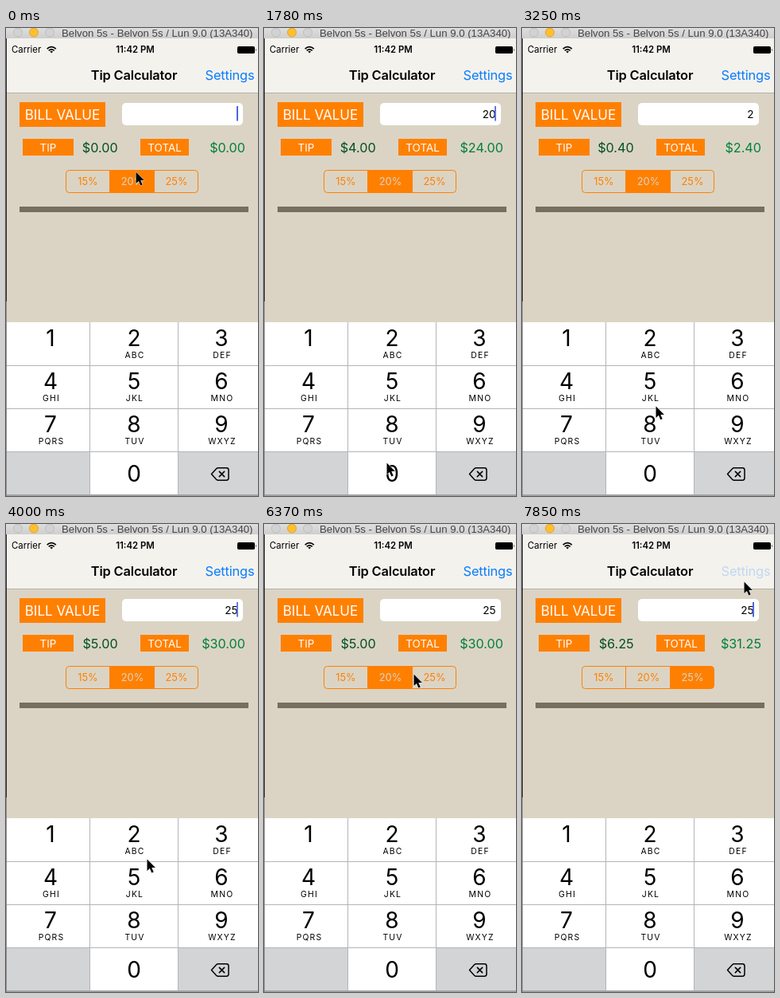
These frames come from a looping animation (317x587 px, 8 s). An HTML page:

```html
<!DOCTYPE html>
<html lang="en">
<head>
<meta charset="utf-8">
<title>Tip Calculator</title>
<style>
  html, body { margin: 0; width: 100%; height: 100%; overflow: hidden; background: #dbd4c5; }
  svg { display: block; width: 317px; height: 587px; font-family: Inter, Roboto, sans-serif; }
  .mid { text-anchor: middle; }
  .end { text-anchor: end; }
  .tag rect { fill: #ff8000; }
  .tag text { fill: #fff; text-anchor: middle; }
  .money { font-size: 16.2px; text-anchor: end; }
  .seg text { font-size: 12.8px; text-anchor: middle; fill: #ff8000; }
  .seg path { fill: none; }
  .seg .on path { fill: #ff8000; }
  .seg .on text { fill: #dbd4c5; }
  .key rect { fill: #fff; }
  .key.down rect { fill: #d2d4d6; }
  .num { font-size: 28px; text-anchor: middle; }
  .abc { font-size: 10.4px; letter-spacing: 1.2px; text-anchor: middle; }
  .del rect { fill: #d2d4d6; }
  .del .shape { fill: none; stroke: #000; stroke-width: 1.5; stroke-linejoin: round; }
  .del .x { fill: none; stroke: #000; stroke-width: 1.6; stroke-linecap: round; }
  .del.down rect { fill: #fff; }
  .del.down .shape { fill: #000; }
  .del.down .x { stroke: #fff; }
</style>
</head>
<body>
<svg viewBox="0 0 317 587">
  <defs>
    <linearGradient id="chrome" x2="0" y2="1">
      <stop offset="0" stop-color="#dedede"/><stop offset="1" stop-color="#cecece"/>
    </linearGradient>
  </defs>
  <rect width="317" height="587" fill="#dbd4c5"/>

  <!-- window chrome -->
  <rect width="317" height="13" fill="url(#chrome)"/>
  <g fill="#d2d2d2" stroke="#bdbdbd">
    <circle cx="15" cy="5.5" r="5.5"/>
    <circle cx="35" cy="5.5" r="5.5" fill="#ffbf2f" stroke="#e2a32c"/>
    <circle cx="55" cy="5.5" r="5.5"/>
  </g>
  <text x="70" y="11" font-size="13.2" fill="#444" font-family="Liberation Sans, Arial, sans-serif">Belvon 5s - Belvon 5s / Lun 9.0 (13A340)</text>

  <!-- status and navigation bars -->
  <rect y="13" width="317" height="68" fill="#f4f2ed"/>
  <rect y="81" width="317" height="1" fill="#b5b1a9"/>
  <text x="7" y="31" font-size="11.4">Carrier</text>
  <g fill="none" stroke="#000" stroke-width="1.7">
    <path d="M51.6 26.1Q57.2 21 62.8 26.1M53.7 28.4Q57.2 25.2 60.7 28.4"/>
    <path d="M55.4 29.5Q57.2 28 59 29.5L57.2 31.6Z" fill="#000" stroke="none"/>
  </g>
  <text class="mid" x="162.5" y="31" font-size="11.4" font-weight="600">11:42 PM</text>
  <rect x="291" y="23" width="22" height="9" rx="1.8"/>
  <path d="M314 25.7Q315.6 27.5 314 29.3Z"/>
  <text class="mid" x="161" y="65" font-size="16.4" font-weight="600" letter-spacing="-.15">Tip Calculator</text>
  <text class="end" id="settings" x="312.5" y="65" font-size="16.4" letter-spacing="-.15" fill="#087cff">Settings</text>

  <!-- bill -->
  <g class="tag">
    <rect x="17" y="93" width="108" height="31"/><text x="71" y="114.5" font-size="17">BILL VALUE</text>
    <rect x="21" y="139" width="64" height="21"/><text x="53" y="154.5" font-size="13.4">TIP</text>
    <rect x="169" y="139" width="61" height="21"/><text x="199.5" y="154.5" font-size="13.4">TOTAL</text>
  </g>
  <rect x="146" y="94" width="152" height="28" rx="5" fill="#fff"/>
  <text class="end" id="bill" x="291.5" y="113" font-size="13.6"></text>
  <rect id="caret" x="290" y="98" width="2" height="18.5" fill="#4a69e2"/>
  <text class="money" id="tip" x="140.7" y="155.5" fill="#00501f"></text>
  <text class="money" id="total" x="301" y="155.5" fill="#00803a"></text>

  <g class="seg" id="segs" stroke-width="1">
    <g><path d="M130.5 178.5H79.5Q75.5 178.5 75.5 182.5V202.5Q75.5 206.5 79.5 206.5H130.5Z" stroke="#ff8000"/><text x="103" y="197">15%</text></g>
    <g><path d="M130.5 178.5H186.5V206.5H130.5Z" stroke="#ff8000"/><text x="159" y="197">20%</text></g>
    <g><path d="M186.5 178.5H237.5Q241.5 178.5 241.5 182.5V202.5Q241.5 206.5 237.5 206.5H186.5Z" stroke="#ff8000"/><text x="214.5" y="197">25%</text></g>
  </g>
  <rect x="17" y="224" width="288" height="7" fill="#786e5d"/>

  <!-- keypad -->
  <rect y="369" width="317" height="216" fill="#d2d4d6"/>
  <g id="keys"></g>
  <g class="del" id="del">
    <rect x="217" y="532" width="100" height="53"/>
    <path class="shape" d="M258.5 559.5L264.6 552.8Q265.6 551.8 267 551.8H277.3Q280 551.8 280 554.5V564.5Q280 567.2 277.3 567.2H267Q265.6 567.2 264.6 566.2Z"/>
    <path class="x" d="M268.4 556.4L274.6 562.6M274.6 556.4L268.4 562.6"/>
  </g>
  <path d="M0 423.5H317M0 477.5H317M0 531.5H317M105.5 369V585M216.5 369V585" stroke="#b4b5b7" fill="none"/>

  <!-- window edges -->
  <rect y="585" width="317" height="2" fill="#a3a3a1"/>
  <rect y="13" width="1" height="330" fill="#2a2725"/>
  <rect y="343" width="1" height="244" fill="#8d8d8d"/>

  <path id="mouse" d="M.5 .5V15L3.9 11.9L6.3 17.4L8.7 16.4L6.3 11H10.9Z" stroke="#fff" stroke-width="1" paint-order="stroke"/>
</svg>
<script>
  const LOOP = 8000, STEPS = 54;
  const $ = id => document.getElementById(id);

  // time, x, y of the pointer tip
  const path = [
    [0, 163, 180], [100, 163, 180], [444, 161, 388], [593, 161, 390], [1037, 154, 545],
    [2080, 154, 545], [2500, 238, 553], [2815, 238, 553], [3259, 168, 474], [3407, 162, 446],
    [3852, 162, 446], [4000, 177, 420], [4444, 104, 190], [4890, 103, 188], [5481, 140, 187],
    [5640, 156, 188], [5935, 156, 188], [6370, 188, 188], [6600, 202, 188], [7115, 202, 188],
    [7700, 279, 72], [LOOP, 279, 72]
  ];

  // time, bill, tip percent, pressed key
  const states = [
    [0, "", 20], [440, "", 20, "2"], [590, "2", 20], [1180, "2", 20, "0"], [1330, "20", 20],
    [2515, "2", 20, "del"], [2810, "2", 20], [3405, "2", 20, "5"], [3550, "25", 20],
    [4590, "25", 15], [5775, "25", 20], [6660, "25", 25], [7850, "25", 25, "settings"]
  ];
  const typed = [-100, 590, 1330, 2515, 3550];

  const colX = [1, 106, 217], colW = [104, 110, 100], mid = [56, 161, 271];
  const letters = ["", "ABC", "DEF", "GHI", "JKL", "MNO", "PQRS", "TUV", "WXYZ"];

  function key(digit, col, row, abc) {
    const y = 370 + row * 54;
    const base = y + (abc === undefined ? 36.5 : 29);
    return `<g class="key" id="k${digit}">
      <rect x="${colX[col]}" y="${y - 1}" width="${colW[col]}" height="54"/>
      <text class="num" x="${mid[col]}" y="${base}">${digit}</text>
      <text class="abc" x="${mid[col] + 1}" y="${y + 44.3}">${abc || ""}</text></g>`;
  }
  $("keys").innerHTML =
    letters.map((abc, i) => key(i + 1, i % 3, Math.floor(i / 3), abc)).join("") + key(0, 1, 3);

  const clamp = v => Math.max(0, Math.min(1, v));
  const latest = (list, t, at) => list.filter(e => at(e) <= t).pop();

  function pointer(t) {
    const i = path.findIndex(p => p[0] > t);
    const [t0, x0, y0] = path[i - 1], [t1, x1, y1] = path[i];
    const u = (t - t0) / (t1 - t0);
    return [x0 + (x1 - x0) * u, y0 + (y1 - y0) * u];
  }

  function caretAlpha(t) {
    const p = (t - latest(typed, t, e => e)) % 1000;
    return p < 750 ? 1 - clamp((p - 430) / 150) : clamp((p - 900) / 100);
  }

  function draw(t) {
    const [, bill, percent, down] = latest(states, t, e => e[0]);
    const tip = bill * percent / 100;
    $("bill").textContent = bill;
    $("tip").textContent = "$" + tip.toFixed(2);
    $("total").textContent = "$" + (+bill + tip).toFixed(2);
    $("caret").setAttribute("opacity", caretAlpha(t));
    [...$("segs").children].forEach((seg, i) => seg.classList.toggle("on", percent === 15 + i * 5));
    for (let d = 0; d < 10; d++) $("k" + d).classList.toggle("down", down === String(d));
    $("del").classList.toggle("down", down === "del");
    $("settings").setAttribute("fill", down === "settings" ? "#bfd8f1" : "#087cff");
    $("mouse").setAttribute("transform", `translate(${pointer(t)})`);
  }

  let start, shown = -1;
  function tick(now) {
    start ??= now;
    const step = Math.floor((now - start) % LOOP * STEPS / LOOP + .1) % STEPS;
    if (step !== shown) draw((shown = step) * LOOP / STEPS);
    requestAnimationFrame(tick);
  }
  draw(0);
  requestAnimationFrame(tick);
</script>
</body>
</html>
```
